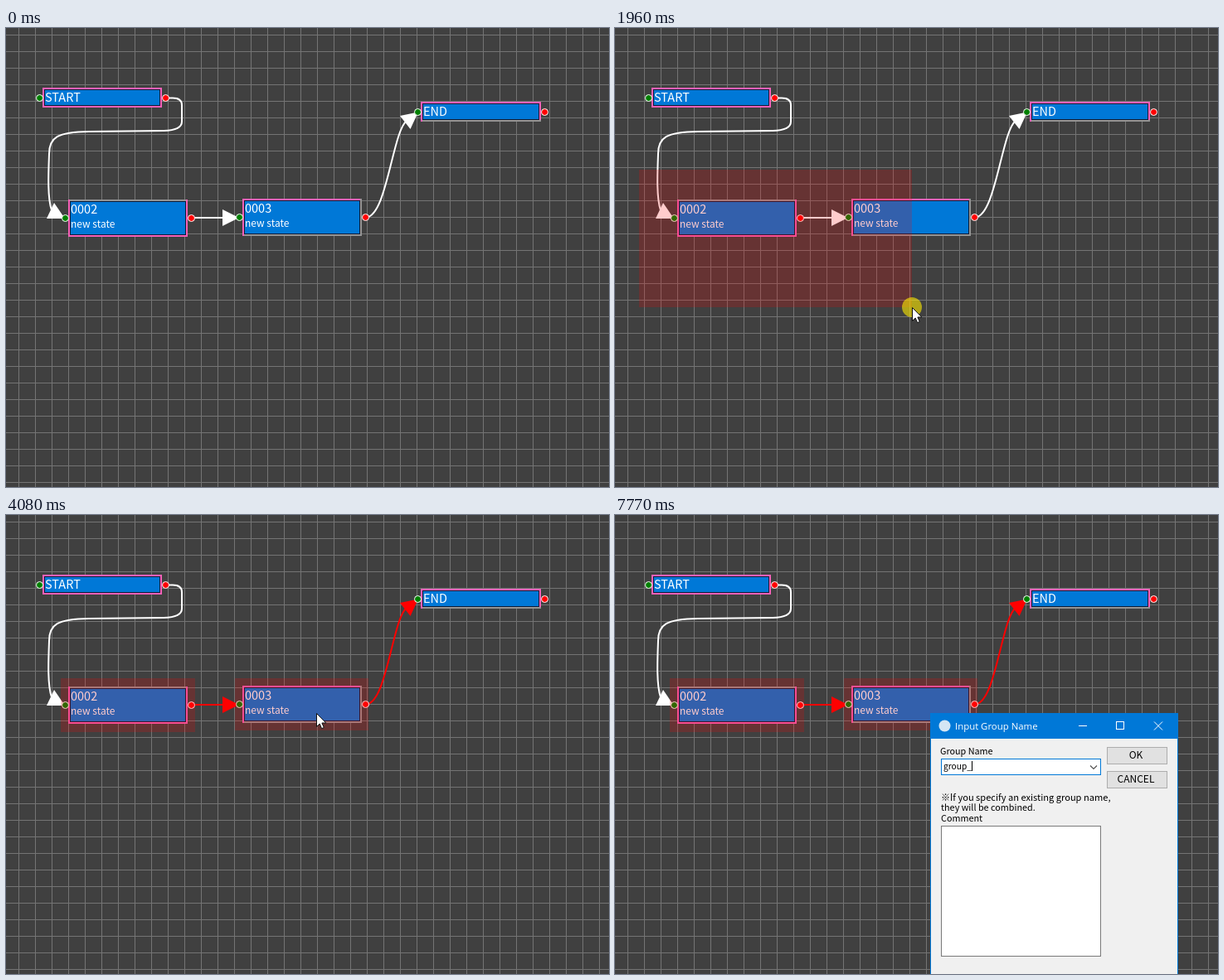
An HTML page that plays this animation: 727x554 px, repeating every 8000 ms.

```html
<!DOCTYPE html>
<html lang="en">
<head>
<meta charset="utf-8">
<title>Grouping states</title>
<style>
  html, body { margin: 0; width: 100%; height: 100%; overflow: hidden; background: #404040; }
  svg { display: block; width: 727px; height: 554px; font-family: "Noto Sans CJK JP", "Noto Sans CJK", "Noto Sans", sans-serif; }
  rect, .crisp { shape-rendering: crispEdges; }
  .edge { --ink: #fff; }
  .edge.hot { --ink: #f00; }
  .edge path { fill: none; stroke: var(--ink); stroke-width: 2; }
  .edge polygon { fill: var(--ink); }
  .node text { fill: #fff; font-size: 14.5px; }
  .node .sub { font-size: 12px; }
  .tint { fill: #f00; fill-opacity: .2; }
  .small { font-size: 10.8px; }
  .button { fill: #e1e1e1; stroke: #adadad; }
  .line { fill: none; stroke: #fff; }
</style>
</head>
<body>
<svg viewBox="0 0 727 554">
  <defs>
    <pattern id="grid" x="15" y="8" width="20" height="20" patternUnits="userSpaceOnUse">
      <path class="crisp" d="M0 0H20V1H1V20H0Z" fill="#747474"/>
    </pattern>
  </defs>
  <rect width="727" height="554" fill="#404040"/>
  <rect width="727" height="554" fill="url(#grid)"/>

  <g id="nodes"></g>
  <g class="edge">
    <path d="M193 84.5H201Q212 84.5 212 93V113Q212 123.5 190 124L100 125C62 125.500 52 132 52 152C51 178 50 205 55 220"/>
    <polygon points="58,211 49,230 71,230"/>
  </g>
  <g class="edge link">
    <path d="M224 229H264"/>
    <polygon points="261,219 261,239 281,229"/>
  </g>
  <g class="edge link">
    <path d="M434 228.500C459 228 466 125 483 112"/>
    <polygon points="475,106 487.500,122 497,101.500"/>
  </g>
  <g id="ports" stroke="#fff"></g>

  <g id="glow" class="tint">
    <rect x="66" y="197" width="162" height="65"/>
    <rect x="276" y="197" width="161" height="63"/>
  </g>
  <rect id="marquee" class="tint" x="29" y="171"/>

  <g id="menu" font-size="12">
    <rect x="335.500" y="223.500" width="143" height="69" fill="#f2f2f2" stroke="#ccc"/>
    <rect id="hover" x="337" y="225" width="140" height="22" fill="#91c9f7"/>
    <text x="369" y="240">Group</text>
    <text x="369" y="262">Copy</text>
    <text x="369" y="284">Delete</text>
  </g>

  <g id="dialog">
    <rect x="380" y="239" width="299" height="320" fill="#0078d7"/>
    <rect x="381" y="270" width="297" height="290" fill="#f0f0f0"/>
    <circle cx="397.500" cy="254.500" r="7" fill="#d5e6f4"/>
    <text x="410" y="259" fill="#fff" style="font:11.4px 'Open Sans', 'Noto Sans', sans-serif">Input Group Name</text>
    <path class="line crisp" d="M559 254.500H569M604.500 249.500H613.500V258.500H604.500Z"/>
    <path class="line" d="M650 249.500L660 259.500M660 249.500L650 259.500"/>

    <rect class="button" x="593.500" y="280.500" width="72" height="20"/>
    <rect class="button" x="593.500" y="309.500" width="72" height="20"/>
    <g font-size="12" text-anchor="middle">
      <text x="628" y="294">OK</text>
      <text x="628" y="323">CANCEL</text>
    </g>

    <text class="small" x="392" y="289">Group Name</text>
    <rect x="393.500" y="294.500" width="192" height="19" fill="#fff" stroke="#0078d7"/>
    <path d="M573 302.500L577 306.500L581 302.500" fill="none" stroke="#555" stroke-width="1.200"/>
    <rect id="highlight" x="396" y="297" width="25" height="12" fill="#39f"/>
    <text id="field" x="396" y="307" font-size="10.2"></text>
    <rect id="caret" y="297" width="1" height="12"/>

    <text x="393" y="345" font-size="11.1">※If you specify an existing group name,</text>
    <text class="small" x="393" y="357">they will be combined.</text>
    <text class="small" x="393" y="370">Comment</text>
    <rect x="393.500" y="375.500" width="192" height="157" fill="#fff" stroke="#7a7a7a"/>
  </g>

  <g id="pointer">
    <circle id="press" r="12" fill="#ffeb00" fill-opacity=".6"/>
    <path d="M.5 .5V16.500L4.200 13L6.600 18.700L9.300 17.500L6.900 12H11.800Z" fill="#fff" stroke="#111"/>
  </g>
</svg>

<script>
const LOOP = 8000;
const $ = id => document.getElementById(id);
const links = document.querySelectorAll('.link');
const PINK = '#f560b8', GREY = '#949494';

// Border colours run top, right, bottom, left.
function addNode(x, y, w, h, title, sub, borders) {
  const corners = [[x + 1, y + 1], [x + w - 1, y + 1], [x + w - 1, y + h - 1], [x + 1, y + h - 1]];
  const sides = borders.map((color, i) =>
    `<path class="crisp" d="M${corners[i]}L${corners[(i + 1) % 4]}" stroke="${color}" stroke-width="2" stroke-linecap="square"/>`);
  $('nodes').innerHTML += `<g class="node">
    <rect x="${x + 2.5}" y="${y + 2.5}" width="${w - 5}" height="${h - 5}" fill="#0078d7" stroke="#0b1c38"/>
    ${sides.join('')}
    <text x="${x + 3}" y="${y + 17}">${title}</text>
    <text class="sub" x="${x + 3}" y="${y + 34}">${sub}</text></g>`;
  const cy = y + Math.floor(h / 2) + .5;
  $('ports').innerHTML += `<circle cx="${x - 3.5}" cy="${cy}" r="4" fill="#008000"/>
    <circle cx="${x + w + 4.5}" cy="${cy}" r="4" fill="#f00"/>`;
}
addNode(44, 72, 144, 24, 'START', '', [PINK, PINK, PINK, PINK]);
addNode(75, 207, 144, 45, '0002', 'new state', [GREY, PINK, PINK, PINK]);
addNode(285, 206, 144, 45, '0003', 'new state', [PINK, GREY, GREY, PINK]);
addNode(500, 89, 145, 24, 'END', '', [PINK, PINK, GREY, PINK]);

// Pointer moves: start, end, step count, from, to, easing.
const linear = u => u;
const smooth = u => u * u * (3 - 2 * u);
const moves = [
  [70, 860, 11, [558, 516], [37, 174], smooth],
  [950, 1170, 4, [35, 174], [29, 173], linear],
  [1320, 1320, 1, [29, 172], [29, 172], linear],
  [1460, 1730, 5, [36, 178], [199, 295], linear],
  [1810, 2050, 4, [285, 322], [504, 366], linear],
  [2350, 2750, 6, [505, 359], [335, 222], smooth],
  [3370, 3530, 3, [342, 226], [362, 235], linear],
  [3830, 3830, 1, [374, 239], [374, 239], linear],
  [4140, 4450, 5, [386, 248], [528, 346], smooth]
];

const typing = [[0, 'hoge'], [5610, 'g'], [6150, 'gr'], [6380, 'gro'], [6610, 'grou'], [6850, 'group'], [7770, 'group_']];
const caretOff = [[4680, 5000], [5300, 5610], [5980, 6150], [7170, 7460]];

const within = (t, from, to) => t >= from && t < to;
const show = (id, on) => { $(id).style.display = on ? '' : 'none'; };
const latest = (list, t) => list.filter(item => item[0] <= t).pop();

function pointerAt(t) {
  const [start, end, count, from, to, ease] = latest(moves, t) || moves[0];
  const gap = (end - start) / (count - 1) || 1;
  const step = Math.max(0, Math.min(count - 1, Math.floor((t - start) / gap + 1e-6)));
  const u = ease(count > 1 ? step / (count - 1) : 1);
  return from.map((v, i) => Math.round(v + (to[i] - v) * u));
}

function render(t) {
  const [x, y] = pointerAt(t);
  const dragging = within(t, 1320, 2350);
  const grouped = t >= 2350;
  const selected = t < 5610;

  show('pointer', within(t, 70, 5690));
  $('pointer').setAttribute('transform', `translate(${x} ${y})`);
  show('press', dragging);
  show('marquee', within(t, 1460, 2350));
  $('marquee').setAttribute('width', Math.max(0, x - 29));
  $('marquee').setAttribute('height', Math.max(0, y - 171));

  show('glow', grouped);
  links.forEach(link => link.classList.toggle('hot', grouped));

  show('menu', within(t, 2900, 3830));
  $('menu').style.opacity = Math.min(1, (Math.floor((t - 2900) / 75) + 1) / 3);
  show('hover', t >= 3370);

  show('dialog', t >= 4290);
  show('highlight', selected);
  const field = $('field');
  field.textContent = latest(typing, t)[1];
  field.setAttribute('fill', selected ? '#fff' : '#000');
  show('caret', !caretOff.some(([from, to]) => within(t, from, to)));
  $('caret').setAttribute('x', selected ? 420 : Math.round(396 + field.getComputedTextLength()));
  $('caret').setAttribute('fill', selected ? '#c60' : '#000');
}

const begin = performance.now();
function tick() {
  render((performance.now() - begin) % LOOP);
  requestAnimationFrame(tick);
}
tick();
</script>
</body>
</html>
```
